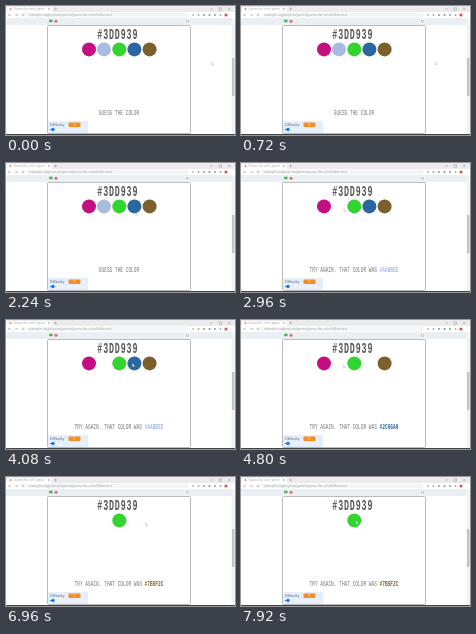
These frames come from a looping animation (229x129 px, 8000 ms). An HTML page:

```html
<!DOCTYPE html>
<html lang="en">
<head>
<meta charset="utf-8">
<title>Guess the color</title>
<style>
  html, body { margin: 0; width: 100%; height: 100%; overflow: hidden; background: #fff; }
  svg { display: block; width: 100vw; height: 100vh; }
  text { font-family: "Liberation Sans", Arial, sans-serif; }
  .mono { font-family: "Liberation Mono", monospace; white-space: pre; }
  .line { fill: none; stroke: #999; stroke-width: .5; }
</style>
</head>
<body>
<svg viewBox="0 0 229 129">
  <!-- browser window -->
  <rect width="229" height="6" fill="#eceaec"/>
  <path d="M1 6V2q0-1 1-1H45q1 0 1 1V6z" fill="#fff"/>
  <circle cx="4.5" cy="3" r="1.2" fill="#f0a183"/>
  <text x="7.5" y="4.2" font-size="3.2" fill="#aaa">Guess the color game</text>
  <path class="line" d="M42 2l2 2m0-2l-2 2M48 3h3m-1.500-1.500v3M204 3h3M213 1.800h2.500v2.500H213zM222 1.800l2.500 2.500m0-2.500l-2.500 2.500"/>
  <rect y="6" width="229" height="6" fill="#fff"/>
  <rect x="20" y="6.700" width="163" height="4.600" rx="2.300" fill="#f4f5f6"/>
  <path class="line" d="M5 9H2.500m1-1l-1 1 1 1M9 9h2.500m-1-1l1 1-1 1"/>
  <circle class="line" cx="17" cy="9" r="1.100"/>
  <text x="23" y="10.200" font-size="3.400" fill="#aaa">example.org/projects/games/guess-the-color/fullscreen/</text>
  <g id="icons"></g>

  <!-- player -->
  <rect y="12" width="226" height="7" fill="#e9eff3"/>
  <path d="M43.200 13.700h3.300v2.500h-3.300z" fill="#4cae55"/>
  <circle cx="50" cy="15.200" r="1.500" fill="#e36a6a"/>
  <rect x="179.500" y="13" width="4.500" height="4.500" rx=".5" fill="#fff"/>
  <rect class="line" x="180.700" y="14.200" width="2.200" height="2"/>
  <rect x="41.500" y="19.500" width="143" height="108" rx="1" fill="#fff" stroke="#aaa" stroke-width=".8"/>
  <text class="mono" transform="translate(91.300 33) scale(1 1.800)" font-size="8.300" letter-spacing=".88" font-weight="bold" fill="#555">#3DD939</text>
  <g id="dots"></g>
  <text class="mono" transform="translate(113 109.300) scale(1 1.500)" font-size="4.500" text-anchor="middle" fill="#777"><tspan id="msg"></tspan><tspan id="code" font-weight="bold"></tspan></text>

  <!-- difficulty slider -->
  <rect x="42" y="115" width="40" height="12" rx="1" fill="#e5effc"/>
  <text x="44" y="120.300" font-size="3.800" fill="#667">Difficulty</text>
  <rect x="62.500" y="116.500" width="12" height="4.600" rx="1" fill="#f58d22"/>
  <text x="68.500" y="120.200" font-size="3.600" fill="#fff" text-anchor="middle">5</text>
  <rect x="44" y="122.800" width="36" height="1.400" rx=".7" fill="#edf2f9"/>
  <rect x="43.800" y="122.900" width="3" height="1.200" rx=".6" fill="#1677f0"/>
  <circle cx="47" cy="123.500" r="1.700" fill="#1677f0"/>

  <!-- scroll bar and bottom edge -->
  <rect x="225.500" y="12.500" width="3.500" height="116" fill="#f3f3f3"/>
  <rect x="226" y="52" width="2.500" height="38" fill="#c4c4c4"/>
  <rect y="128" width="229" height="1" fill="#444"/>

  <path id="cursor" d="M0 0V3L.8 2.300 1.400 3.500 1.900 3.300 1.300 2.200H2.200z" fill="#fff" stroke="#aaa" stroke-width=".35"/>
</svg>
<script>
  const LOOP = 8000;
  const $ = id => document.getElementById(id);

  function circle(parent, cx, cy, r, fill) {
    const c = document.createElementNS("http://www.w3.org/2000/svg", "circle");
    for (const [k, v] of Object.entries({ cx, cy, r, fill })) c.setAttribute(k, v);
    return parent.appendChild(c);
  }

  ["#bbb", "#aaa", "#999", "#5f9f9f", "#999", "#aaa", "#d9534f"].forEach((fill, i) =>
    circle($("icons"), 187 + i * 5.5, 9, i < 6 ? 1 : 1.6, fill));

  // x, color, label, time of the wrong guess
  const dots = [
    [83, "#c40f82", "#C40F82", 5280],
    [98, "#aabbe2", "#AABBEE", 2960],
    [113.3, "#32d52f", "#3DD939", Infinity],
    [128.4, "#2c66a0", "#2C66A0", 4240],
    [143.6, "#7b5f2c", "#7B5F2C", 6960]
  ].map(([x, color, label, gone]) =>
    ({ color, label, gone, el: circle($("dots"), x, 43.4, 7, color) }));

  // time, x, y
  const path = [
    [0, 205.5, 56], [320, 205.5, 56], [1520, 162, 55], [2880, 103, 45.5],
    [3200, 103, 45.5], [4000, 126.5, 43.5], [4320, 126.5, 43.5], [5200, 84, 45.5],
    [5600, 84, 45.5], [6320, 139.5, 45.5], [7040, 139.5, 45.5], [7760, 115, 44], [LOOP, 115, 44]
  ];

  function cursorAt(t) {
    const i = path.findIndex(p => p[0] > t);
    const [t0, x0, y0] = path[i - 1], [t1, x1, y1] = path[i];
    const u = (t - t0) / (t1 - t0), e = u * u * (3 - 2 * u);
    return [x0 + (x1 - x0) * e, y0 + (y1 - y0) * e];
  }

  function draw(now) {
    const t = now % LOOP;
    let last = null;
    for (const d of dots) {
      const gone = t >= d.gone;
      d.el.style.display = gone ? "none" : "";
      if (gone && (!last || d.gone > last.gone)) last = d;
    }
    $("msg").textContent = last ? "TRY AGAIN. THAT COLOR WAS " : "GUESS THE COLOR";
    $("code").textContent = last ? last.label : "";
    $("code").style.fill = last ? last.color : "";
    $("cursor").setAttribute("transform", `translate(${cursorAt(t)})`);
    requestAnimationFrame(draw);
  }
  draw(performance.now());
</script>
</body>
</html>
```
